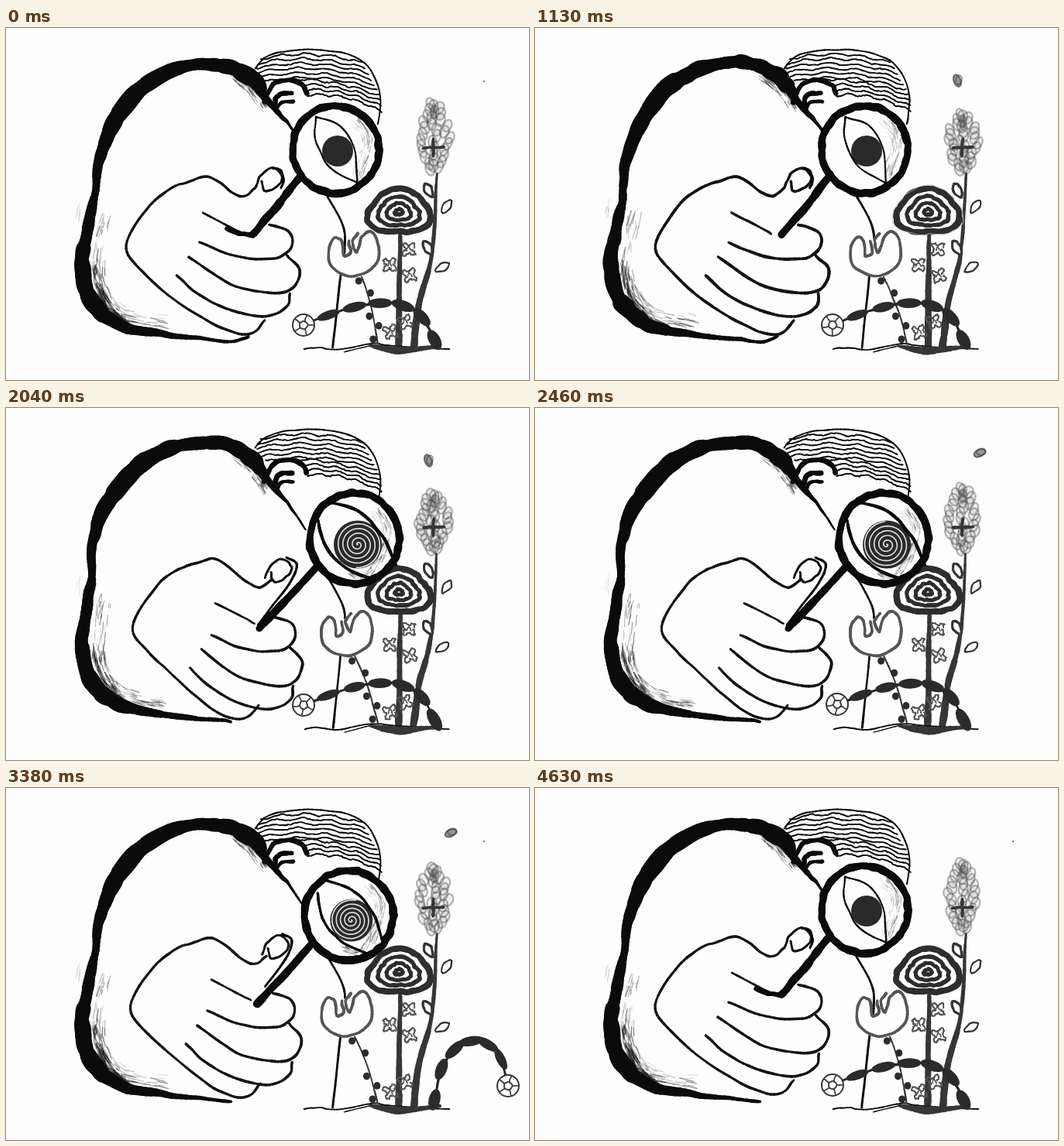
Write an HTML page with a canvas that moves like this. It is 675 by 455 pixels and loops after 4.68 s.

```html
<!DOCTYPE html>
<html lang="en">
<head>
<meta charset="utf-8">
<title>Looking closely</title>
<style>
html, body { margin: 0; width: 100%; height: 100%; overflow: hidden; background: #fdfdfd; }
canvas { display: block; }
</style>
</head>
<body>
<canvas id="stage" width="675" height="455"></canvas>
<script>
const g = document.getElementById('stage').getContext('2d');
const LOOP = 4680, PAPER = '#fdfdfd', INK = '#0b0b0b', SOFT = '#363636', PENCIL = '#555';
let step = 0, boil = 0, mark = 0;

const lerp = (a, b, u) => a + (b - a) * u;
const mix = (a, b, u) => a.map((n, k) => lerp(n, b[k], u));
const ease = u => { u = Math.min(1, Math.max(0, u)); return u * u * (3 - 2 * u); };
const hash = n => { const s = Math.sin(n * 127.1) * 43758.5; return s - Math.floor(s); };
const noise = x => { const k = Math.floor(x); return lerp(hash(k), hash(k + 1), ease(x - k)) * 2 - 1; };
const range = n => [...Array(n).keys()];

// Apply f(x, y) to a flat list of points
function warp(p, f) {
  const out = [];
  for (let k = 0; k < p.length; k += 2) out.push(...f(p[k], p[k + 1]));
  return out;
}
const place = (p, x, y, a = 0) => warp(p, (u, v) =>
  [x + u * Math.cos(a) - v * Math.sin(a), y + u * Math.sin(a) + v * Math.cos(a)]);
const ring = (n, f) => range(n).flatMap(k => f(k / n * Math.PI * 2));

// Value of a list of [time, values] keys at the given time
function keyed(keys, at) {
  let k = 0;
  while (k < keys.length - 2 && at >= keys[k + 1][0]) k++;
  const [t0, a] = keys[k], [t1, b] = keys[k + 1];
  return mix(a, b, Math.min(1, Math.max(0, (at - t0) / (t1 - t0))));
}

// Catmull-Rom through a flat list of points with d values each
function curve(p, d = 2, closed = false) {
  const n = p.length / d, last = closed ? n : n - 1, cuts = 8, out = [];
  const at = (k, c) => p[(closed ? (k + n) % n : Math.min(n - 1, Math.max(0, k))) * d + c];
  for (let k = 0; k < last; k++) {
    for (let j = 0; j < cuts + (k === last - 1); j++) {
      const u = j / cuts;
      out.push(range(d).map(c => {
        const a = at(k - 1, c), b = at(k, c), e = at(k + 1, c), f = at(k + 2, c);
        return b + (e - a + u * (2 * a - 5 * b + 4 * e - f + u * (3 * (b - e) + f - a))) * u / 2;
      }));
    }
  }
  return out;
}

// Hand-drawn line; d = 3 takes a width with every point
function ink(p, w, { color = INK, d = 2, closed = false, fill, wob = .6 } = {}) {
  const s = curve(p, d, closed), z = ++mark * 91 + boil * 37;
  const pts = s.map((q, k) => [q[0] + noise(k * .35 + z) * wob, q[1] + noise(k * .35 + z + 500) * wob]);
  if (closed) pts[pts.length - 1] = pts[0];
  if (fill) {
    g.fillStyle = fill;
    g.beginPath();
    pts.forEach(q => g.lineTo(...q));
    g.fill();
  }
  g.strokeStyle = color;
  g.lineCap = 'round';
  for (let k = 1; k < pts.length; k++) {
    g.lineWidth = Math.max(.6, (d === 3 ? s[k][2] : w) * (1 + .14 * noise(k * .6 + z)));
    g.beginPath();
    g.moveTo(...pts[k - 1]);
    g.lineTo(...pts[k]);
    g.stroke();
  }
}

// Dry brush: short strokes beside a path
function scratch(p, depth, count, len, dark = .5) {
  const s = curve(p), z = ++mark * 53 + boil * 211;
  for (let k = 0; k < count; k++) {
    const r = n => hash(z + k * 5 + n), j = 1 + Math.floor(r(0) * (s.length - 2)), [x, y] = s[j];
    const a = Math.atan2(s[j + 1][1] - s[j - 1][1], s[j + 1][0] - s[j - 1][0]), b = a + (r(4) - .5) * .4;
    const off = depth * r(1) ** 2, l = len * (.3 + r(2)) / 2, dx = Math.cos(b) * l, dy = Math.sin(b) * l;
    const cx = x - Math.sin(a) * off, cy = y + Math.cos(a) * off;
    g.strokeStyle = `rgba(20,20,20,${dark * (.3 + .7 * r(3))})`;
    g.lineWidth = .6 + r(4) * .9;
    g.beginPath();
    g.moveTo(cx - dx, cy - dy);
    g.lineTo(cx + dx, cy + dy);
    g.stroke();
  }
}

function blob(x, y, rx, ry, a, fill, stroke, w = 2) {
  g.beginPath();
  g.ellipse(x, y, rx, ry, a, 0, 7);
  if (fill) { g.fillStyle = fill; g.fill(); }
  if (stroke) { g.strokeStyle = stroke; g.lineWidth = w; g.stroke(); }
}

const back = [330,82,12, 316,64,21, 285,50,18, 245,48,16, 208,58,19, 168,84,22, 138,126,20, 120,172,14, 115,215,10,
  105,260,15, 98,300,18, 104,340,20, 122,367,21, 152,386,16, 200,395,9, 250,401,6, 291,405,4];
const SWELL = [0, 2, 4, 3, 9];

function body() {
  const p = back.slice();
  for (let n = 0; n < p.length / 3; n++) {
    if (boil && n > 1 && n < 6) p[n * 3 + 1] -= 3;
    p[n * 3] -= SWELL[boil] * Math.exp(-(((n - 6.5) / 1.8) ** 2));
  }
  if (boil === 3 || step === 0) p.push(313, 399, 4);
  ink(p, 0, { d: 3, wob: 1.1 });
  const inner = [121,240, 112,310, 122,348, 150,376, 205,387];
  scratch(inner, -16, 130, 16);
  scratch(inner.slice(2, 8), -8, 60, 14, .7);
  scratch([298,60, 318,76, 338,102], 10, 70, 13);
  scratch([96,215, 95,245], 4, 6, 14, .15);
  if (boil === 0) blob(617, 69, 1, 1.2, 0, '#777');
}

function head() {
  ink([322,52, 333,39, 355,31, 395,28, 437,33, 468,51, 483,88, 480,124], 2);
  for (let k = 0; k < 10; k++) {
    const low = k > 5, x0 = low ? 326 + 7 * k : 324 + (k - 2) ** 2 * 1.2, y0 = low ? 24 + 7 * k : 40 + 5.8 * k;
    const x1 = 459 + 26 * Math.sin(k * .17), y1 = 45 + k * 7, bow = (y0 + y1) / 2 - 34 - k * 6.2;
    ink(range(15).flatMap(j => {
      const u = j / 14;
      return [lerp(x0, x1, u), lerp(y0, y1, u) - bow * 4 * u * (1 - u) + 1.5 * Math.sin(j * 1.75 + k * .8)];
    }), 1.7);
  }
  ink([333,96, 345,73, 365,67, 383,74, 388,84], 6, { fill: PAPER });
  ink([347,98, 349,90, 356,85, 369,84], 6);
  ink([350,104, 356,96, 371,95], 4.5);
  ink([330,84,11, 351,109,7, 366,126,4, 387,157,2], 0, { d: 3 });
  ink([412,213, 435,255, 437,285, 431,325, 422,413], 2.8);
}

function cloud(x, y) {
  const lobes = ring(18, a => { const r = 7.5 + 3 * Math.sin(a * 4 + x); return [x + Math.cos(a) * r, y + Math.sin(a) * r]; });
  ink(lobes, 1.7, { color: PENCIL, wob: 1 });
  ink([x - 3, y + 2, x, y - 3, x + 3, y + 2], 1.4, { color: PENCIL });
}

const leaf = (x, y, a, w) => ink(place([0,9, -5,-2, 0,-11, 5,-3], x, y, a), w, { color: SOFT, closed: true, fill: PAPER });

// Petals drift away from the tall flower, 22 steps per round
const firstPetal = [[2, [553, 96]], [5, [545, 68]], [13, [557, -14]]];
const lastPetal = [[12, [562, 92]], [15, [574, 58]], [17, [577, 45]], [21, [583, 17]]];

function petal([x, y], a) {
  blob(x, y, 4.5, 8, a, 'rgba(60,60,60,.55)', 'rgba(60,60,60,.7)');
  blob(x + 2, y - 1, 4, 6, a + .5, null, 'rgba(60,60,60,.6)', 1.5);
}

function tallFlower() {
  const ph = step % 22, top = ph < 2 ? 98 : ph < 12 ? 112 : ph < 16 ? 104 : 115;
  ink([556,188,3, 552,265,4.5, 546,310,6, 533,358,8, 526,412,9], 0, { d: 3, color: SOFT });
  leaf(546, 211, -.5, 3);
  leaf(568, 232, .6, 2);
  leaf(545, 285, -.5, 3);
  leaf(562, 310, 1, 2);
  for (let k = 0; k < 34; k++) {
    const u = k / 33, z = k * 5 + boil * 71 + ph * 13;
    const side = (k % 3 - 1) * .85 + noise(z) * .25, x = 552 + side * 19 * Math.sin(Math.PI * (.06 + .86 * u));
    blob(x, lerp(top, 183, u), 4.5 + hash(z + 1) * 2, 8, side * .4, 'rgba(90,90,90,.09)', 'rgba(80,80,80,.42)', 2.2);
  }
  blob(552, top + 10, 4, 11, 0, 'rgba(60,60,60,.3)');
  ink([539,155, 565,154], 4, { color: SOFT });
  ink([552,143, 551,165], 4, { color: SOFT });
  if (ph >= 2 && ph < 14) petal(keyed(firstPetal, ph), -.35);
  if (ph >= 12) petal(keyed(lastPetal, ph), ph < 17 ? 1.1 : .3);
}

function rose() {
  ink([509,265,5, 508,330,7, 507,412,9], 0, { d: 3, color: SOFT });
  [[520,286], [495,306], [521,320], [515,380], [496,393]].forEach(q => cloud(...q));
  const loop = (s, w, more) => ink(ring(12, a => {
    const r = s * (1 - .1 * Math.sin(3 * a - Math.PI));
    return [507 + 40 * r * Math.cos(a), 238 + 28 * r * Math.sin(a)];
  }), w, { closed: true, color: '#2e2e2e', wob: .9, ...more });
  loop(1, 7.5, { fill: PAPER });
  loop(.66, 5);
  loop(.39, 4.5);
  loop(.13, 4);
  if (boil === 3) loop(1.13, .7, { color: '#bbb' });
}

function ground() {
  ink([385,415, 405,413, 428,416, 472,408, 500,411, 572,415], 1.8);
  ink([437,419, 472,410], 1.5);
  ink([470,411,3, 508,417,10, 560,411,4], 0, { d: 3, color: SOFT });
}

// 1 is fully bent to the left
const sway = [[0, [-.36]], [14, [0]], [82, [0]], [92, [1]], [102, [0]], [112, [-.36]]];
const cup = [-6,-18, -5,-2, -14,0, -15,-17, -23,-23, -32,-10, -29,14, 0,28, 29,12, 31,-18, 22,-29, 11,-22, 4,-3, -1,-18, 6,-27];

function tulipStem(x, y, a) {
  const [bx, by] = place([9, 29], x, y, a);
  const p = [bx, by, lerp(bx, 480, .55) + 2, lerp(by, 408, .5), 480, 408], s = curve(p);
  ink(p, 2, { color: SOFT });
  [1, 4, 9, 11, 14].forEach((k, n) => blob(s[k][0] + (n % 2 ? 5 : -5), s[k][1] + 2, 4.5, 4.8, 0, '#2c2c2c'));
}

// Two handles and the head; the tail stays in the ground
const rest = [530,328, 445,358, 384,384];
const stretch = [530,328, 448,360, 390,383];
const raised = [535,340, 500,290, 443,262];
const climb = [525,330, 620,310, 563,248];
const over = [560,310, 640,300, 648,385];
const low = [530,330, 455,340, 396,404];
const crawl = [[0, rest], [52, rest], [59, stretch], [65, raised], [71, climb], [77, over], [82, over], [88, raised],
  [92, low], [97, low], [104, rest], [112, rest]];

function caterpillar() {
  const q = [553, 403, ...keyed(crawl, step)];
  const at = (u, c) => (1 - u) ** 3 * q[c] + 3 * u * (1 - u) ** 2 * q[2 + c] + 3 * u * u * (1 - u) * q[4 + c] + u ** 3 * q[6 + c];
  const p = range(7).flatMap(k => [at(k / 6, 0), at(k / 6, 1)]);
  ink(p, 3, { color: '#262626' });
  for (let k = 0; k < 6; k++) {
    const j = Math.max(0, k - 1), a = Math.atan2(p[2 * k + 3] - p[2 * j + 1], p[2 * k + 2] - p[2 * j]);
    blob(p[2 * k], p[2 * k + 1], 15 + noise(k + boil * 9), 7.5 - k * .35, a, '#2b2b2b');
  }
  const [x, y] = p.slice(12), r = 14;
  blob(x, y, r, r, 0, PAPER, SOFT);
  const dot = (s, a) => [x + Math.cos(a) * r * s, y + Math.sin(a) * r * s];
  for (let k = 0; k < 5; k++) {
    const a = k * Math.PI * .4 + boil * .12;
    ink([...dot(.95, a), ...dot(.42, a), ...dot(.35, a + .63), ...dot(.42, a + 1.26)], 1.5, { color: '#444', wob: .3 });
  }
}

function glass(u) {
  const x = lerp(425.5, 450, u), y = lerp(157, 168.5, u), r = lerp(56, 58, u);
  blob(x, y, r, r, 0, PAPER);
  scratch(place([30,-40, 47,-12, 34,36], x, y), 13, 75, 10, .28);
  const ex = lerp(428, 454, u), ey = lerp(159, 176.5, u), er = lerp(20, 31, u);
  if (u > .5) scratch(place([34,-6, 12,36, -8,34], ex, ey), -7, 60, 9, .4);
  blob(ex, ey, er, er, 0, '#2a2a2a');
  if (u > .4) {
    g.strokeStyle = '#d9d9d9';
    g.lineWidth = 1.7;
    g.beginPath();
    for (let a = 0; a < 31; a += .15) {
      const q = a / 31 * (er - 1), b = a + step * .3;
      g.lineTo(ex + Math.cos(b) * q, ey + Math.sin(b) * q);
    }
    g.stroke();
  }
  const lid = lerp(2.2, 4, u);
  ink(mix([400,115, 430,126, 449,155, 453,200], [420,122, 455,134, 485,165, 503,203], u), lid);
  ink(mix([400,115, 400,145, 418,180, 453,200], [403,145, 412,178, 438,206, 475,222], u), lid);
  ink(ring(16, a => [x + Math.cos(a) * r, y + Math.sin(a) * r * 1.01]), 9.5, { closed: true, wob: .9 });
  ink(mix([378,194, 350,230, 318,267], [400,207, 364,246, 327,285], u), 10);
  if (u < .5 && boil !== 3) ink([285,259, 300,265, 316,268], 6);
}

const palm = [322,206, 308,217, 293,213, 264,193, 238,198, 212,208, 185,230, 155,281, 175,313, 215,350, 272,385, 313,396, 334,378];
const nail = [322,206, 330,189, 343,181, 354,187, 356,197, 345,208, 333,210, 330,198];
const index = [340,254, 366,264, 368,284, 346,298, 296,295, 250,277];
const middle = [362,294, 379,312, 370,336, 343,343, 290,331, 236,296];
const third = [366,343, 363,360, 335,373, 290,365, 250,345, 220,320];

function hand(u) {
  const part = (p, f, w = 3.2) => ink(mix(p, warp(p, f), u), w + boil % 2 * .4, { color: '#141414' });
  part(palm, (x, y) => {
    const thumb = y < 230 ? ease((x - 250) / 72) : 0, heel = y > 350 ? ease((x - 230) / 60) : 0;
    return [x + 8 + 13 * thumb - 16 * heel, y + 2 + 14 * thumb + 4 * heel];
  });
  part(nail, (x, y) => [x + 12, y + 14], 2.8);
  for (const p of [index, middle, third]) part(p, (x, y) => [x + 3 + (380 - x) * .09, y + 16], 3.4);
  part([254,239, 285,255, 305,266], (x, y) => [x + 16, y + 13], 2.6);
  ink(mix([343,181, 354,184, 358,195, 355,207], [362,193, 375,202, 366,226, 325,280], u), 3);
}

function draw() {
  const reach = ease((step - 29) / 7) - ease((step - 78) / 8);
  const [b] = keyed(sway, step), bent = Math.max(0, b), bloom = [440 - 25 * b, 293 + 24 * bent, -.04 - .66 * bent];
  mark = 0;
  g.fillStyle = PAPER;
  g.fillRect(0, 0, 675, 455);
  head();
  body();
  tallFlower();
  rose();
  ground();
  tulipStem(...bloom);
  caterpillar();
  ink(place(cup, ...bloom), 3.6, { color: PENCIL, fill: PAPER, wob: .8 });
  hand(reach);
  glass(reach);
}

let shown = -1;
function tick(now) {
  step = Math.min(111, Math.floor((now % LOOP) * .024 + .1));
  if (step !== shown) {
    shown = step;
    boil = Math.floor(step / 2) % 5;
    draw();
  }
  requestAnimationFrame(tick);
}
tick(performance.now());
</script>
</body>
</html>
```
